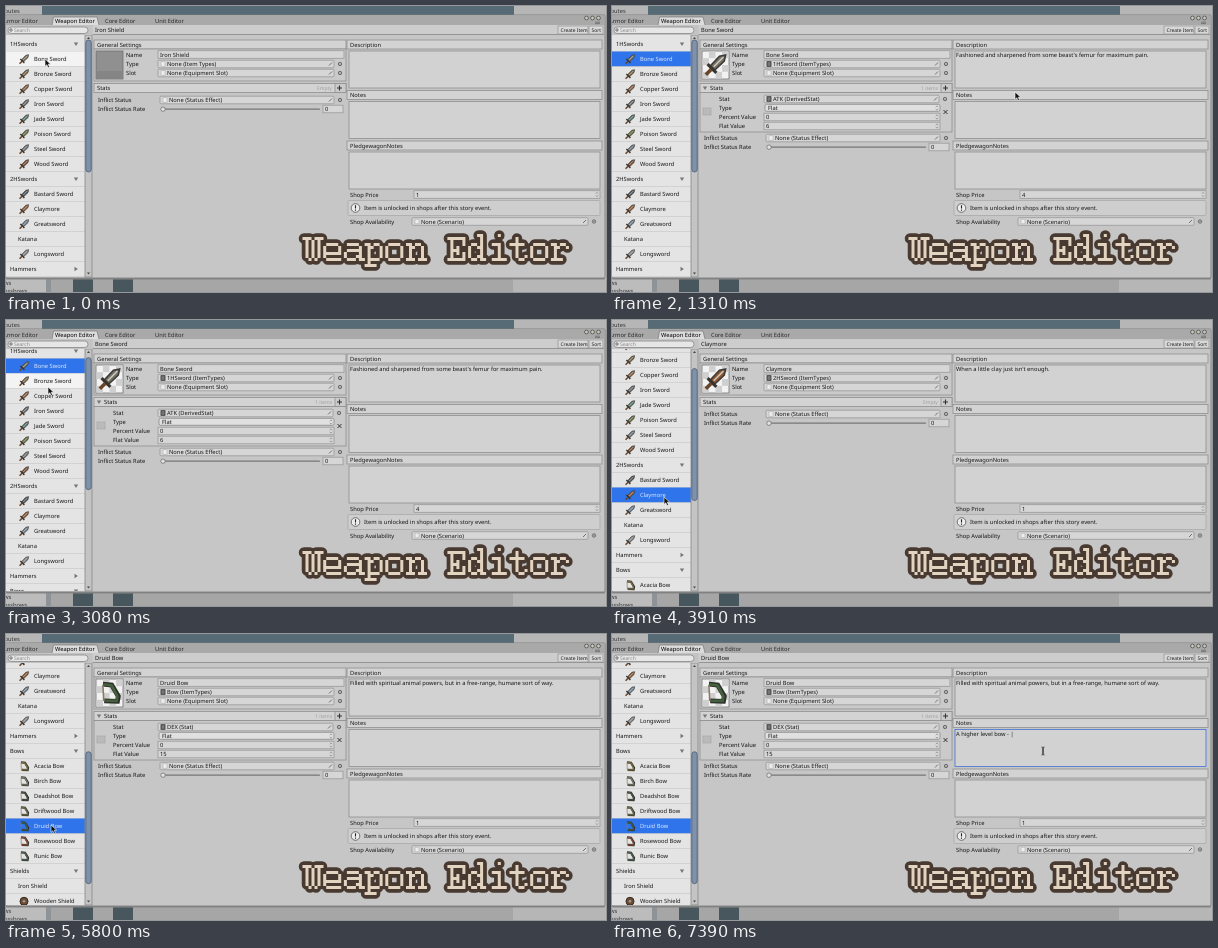
Animation, 600 px wide and 286 px high, one loop 8 s. Source, as an HTML page:

```html
<!DOCTYPE html>
<html lang="en">
<head>
<meta charset="utf-8">
<title>Weapon Editor</title>
<style>
html, body { margin: 0; width: 600px; height: 286px; overflow: hidden; background: #c4c4c4; }
svg { display: block; position: absolute; left: 0; top: 0; }
text { font-family: "Noto Sans", "Open Sans", sans-serif; text-rendering: geometricPrecision; white-space: pre; }
</style>
</head>
<body>
<svg id="ui" width="600" height="286" viewBox="0 0 600 286"></svg>
<svg id="logo" width="600" height="286" viewBox="0 0 600 286" role="img" aria-label="Weapon Editor"></svg>
<script>
const LOOP = 8000;
const INK = '#161616', BLUE = '#2f74ea', LINE = '#8f8f8f';

// Drawing helpers; text is placed by its vertical centre.
const box = (x, y, w, h, fill, stroke, r = 0) =>
  `<rect x="${x}" y="${y}" width="${w}" height="${h}" rx="${r}" fill="${fill}"` +
  (stroke ? ` stroke="${stroke}" stroke-width=".8"` : '') + '/>';
const text = (x, y, s, fill = INK, size = 5.75) =>
  `<text x="${x}" y="${y + 2.1}" font-size="${size}" fill="${fill}">${s}</text>`;
const path = (d, stroke, w = 1, fill = 'none', more = '') =>
  `<path d="${d}" stroke="${stroke}" stroke-width="${w}" fill="${fill}" ${more}/>`;
const ring = (x, y, r, stroke = '#555', fill = 'none') =>
  `<circle cx="${x}" cy="${y}" r="${r}" fill="${fill}" stroke="${stroke}" stroke-width=".8"/>`;
const arrow = (x, y) => path(`M${x - 2.2} ${y - 1.6}h4.4l-2.2 3.6z`, 'none', 0, '#777');

// Weapon list: "#" group, "-" plain entry, otherwise name and colour.
const rows = [
  ['#1HSwords'], ['Bone Sword', '#77715f'], ['Bronze Sword', '#7d6440'], ['Copper Sword', '#8d5b3c'],
  ['Iron Sword', '#686868'], ['Jade Sword', '#54766a'], ['Poison Sword', '#64703a'],
  ['Steel Sword', '#6c757d'], ['Wood Sword', '#7d4a2c'],
  ['#2HSwords'], ['Bastard Sword', '#4c535b'], ['Claymore', '#93562b'], ['Greatsword', '#6c8296'],
  ['-Katana'], ['Longsword', '#84888a'], ['#Hammers'], ['#Bows'],
  ['Acacia Bow', '#7d6a3a'], ['Birch Bow', '#77776a'], ['Deadshot Bow', '#4b5240'], ['Driftwood Bow', '#6d6a48'],
  ['Druid Bow', '#44603f'], ['Rosewood Bow', '#8e4a35'], ['Runic Bow', '#4c6258'],
  ['#Shields'], ['-Iron Shield'], ['Wooden Shield', '#6d4a30']
];
const rowY = i => 38 + 15 * i;

const items = {
  'Iron Shield': { type: 'None (Item Types)', desc: '', price: 1 },
  'Bone Sword': { type: '1HSword (ItemTypes)', stat: ['ATK (DerivedStat)', 6], price: 4,
    desc: "Fashioned and sharpened from some beast's femur for maximum pain." },
  'Claymore': { type: '2HSword (ItemTypes)', desc: "When a little clay just isn't enough.", price: 1 },
  'Druid Bow': { type: 'Bow (ItemTypes)', stat: ['DEX (Stat)', 15], price: 1,
    desc: 'Filled with spiritual animal powers, but in a free-range, humane sort of way.' }
};

// The screen refreshes only at these moments: [first, last, count].
const ticks = [
  [0, 120, 2], [270, 390, 2], [630, 930, 3], [1080, 1790, 7], [1910, 2380, 5], [2620, 3200, 6],
  [3440, 3910, 5], [4710, 4710, 1], [4860, 5100, 3], [5240, 5480, 3], [5680, 5800, 2],
  [5950, 6060, 2], [6210, 6210, 1], [6450, 6670, 3], [7030, 7390, 4]
].flatMap(([a, b, n]) => Array.from({ length: n }, (_, i) =>
  n < 2 ? a : Math.floor((a + (b - a) * i / (n - 1)) / 10) * 10));

const cursorKeys = [[0, 39, 53], [390, 42, 54], [630, 150, 65], [930, 325, 82], [1200, 400, 86], [1310, 403, 86],
  [1550, 402, 85], [1790, 380, 82], [2030, 250, 72], [2380, 58, 67], [2620, 43, 67], [3080, 42, 67],
  [3440, 43, 72], [3800, 51, 172], [3910, 52, 177], [5480, 52, 178], [5680, 45, 190], [5800, 45, 191],
  [6060, 320, 135], [6210, 431, 117]];
const scrollKeys = [[0, 0], [2850, 0], [3080, 7], [3440, 28], [4710, 28], [4860, 52], [5100, 104], [5240, 120], [5480, 161]];
const picks = [[0, 'Iron Shield'], [270, 'Bone Sword'], [3910, 'Claymore'], [5800, 'Druid Bow']];
const typing = [[6210, ''], [6450, 'A h'], [6560, 'A hig'], [6670, 'A highe'], [7030, 'A higher lev'],
  [7150, 'A higher level b'], [7270, 'A higher level bow'], [7390, 'A higher level bow - ']];

const last = (keys, t) => keys.filter(k => k[0] <= t).pop();
function mix(keys, t) {
  const a = last(keys, t), b = keys[keys.indexOf(a) + 1];
  if (!b) return a.slice(1);
  const p = (t - a[0]) / (b[0] - a[0]);
  return a.slice(1).map((v, i) => v + (b[i + 1] - v) * p);
}

// Icon on a 10 unit square centred on x, y.
function icon(name, color, x, y, k = 1) {
  let d;
  if (name.endsWith('Bow')) {
    d = path('M-3-4L1-3.6L4 1.5L3.6 3.8L-2.4 3.6', '#2d3029', 2.2) +
        path('M-2.8-4L1-3.4L3.6 1.6L3.2 3.6L-2 3.5', color, 1.2) +
        path('M-3-3.6L-2.6 3.6', '#8b7a5c', .7);
  } else if (name.endsWith('Shield')) {
    d = `<circle r="4" fill="${color}" stroke="#352a22"/><circle r="1.3" fill="#999"/>`;
  } else {
    d = path('M4.6-4.6L1.8-4L-2.4.4L-.4 2.4L4-1.8z', '#3a3a3a', .7, color) +
        path('M3.6-3.6L-.8.8', '#c9c9c4', .7) +
        path('M-3.6-.4L.4 3.6', '#3a342e', 1.4) + path('M-2 2L-4.4 4.4', '#6a4427', 1.6);
  }
  return `<g transform="translate(${x} ${y}) scale(${k})">${d}</g>`;
}

function backdrop() {
  const tabs = [['Armor Editor', -3], ['Core Editor', 99], ['Unit Editor', 149]];
  return box(0, 0, 600, 286, '#b6b6b6') + box(36, 0, 472, 9, '#566b75') +
    text(-3, 5, 'ibutes', '#333') +
    box(0, 272, 507, 14, '#a6a6a6') + box(0, 272, 40, 14, '#bcbcbc') + box(40, 272, 5, 14, '#8e9398') +
    text(-2, 277, 'ws', '#333') + text(-2, 285, 'ossbows', '#333') +
    box(67, 273, 20, 13, '#48565e') + box(107, 273, 20, 13, '#48565e') +
    box(0, 271, 599, 2.4, '#888', '', 1) +
    box(0, 9, 599, 263, '#c6c6c6', '#777', 1) + box(0, 9.5, 598, 9.5, '#a9a9a9') +
    tabs.map(([s, x]) => text(x, 15, s, '#2a2a2a')).join('') +
    path('M46 19L47.5 11H91L93 19', '#777', .7, '#dcdcdc') + text(49, 15, 'Weapon Editor', '#000') +
    [580.5, 586.5, 592.5].map(x => ring(x, 12, 1.9, '#4c4c4c', '#c9c9bd')).join('') +
    path('M589 17.6h5M589 16.2h5', '#555', .6);
}

function list(scroll, picked, cy, hovering) {
  let s = box(0, 29, 79, 242, '#e4e4e4');
  rows.forEach(([raw, color], i) => {
    const y = rowY(i) - scroll, on = raw === picked, name = raw.replace(/^[#-]/, '');
    if (y < 20 || y > 282) return;
    if (on && color) s += box(0, y - 7.5, 79, 15, BLUE);
    else if (hovering && Math.abs(cy + 1 - y) < 7.5) s += box(0, y - 7.5, 79, 15, '#f3f3f3');
    s += box(0, y + 7.2, 79, .6, '#c6c6c6');
    s += text(raw[0] === '#' ? 4 : color ? 28 : 12, y, name, on && color ? '#dfe9ff' : INK);
    if (color) s += icon(name, color, 18, y + .3);
    if (name === 'Hammers') s += path(`M68.5 ${y - 2.2}v4.4l3.4-2.2z`, 'none', 0, '#777');
    else if (raw[0] === '#') s += arrow(70, y);
  });
  return `<g clip-path="url(#listClip)">${s}</g>` +
    box(79, 29, 7, 242, '#c4c4c4', '#888') +
    box(79.8, 34 + scroll * .52, 5.4, 132, '#7f92ab', '#4d5d72', 2.7) +
    path('M81 33l1.5-2l1.5 2zM81 266.5l1.5 2l1.5-2z', 'none', 0, '#444') +
    box(0, 19, 86, 10, '#c3c3c3') + box(2, 21, 80, 6.5, '#e6e6e6', '#888', 3.2) +
    ring(5, 24, 1.2) + text(8, 24, 'Search', '#888', 5);
}

const header = (x, y, w, s, h = 9) => box(x, y, w, h, '#d3d3d3', LINE) + text(x + 3, y + h / 2, s);
const area = (y, s, focus) => box(343, y, 251, 37, '#d2d2d2', focus ? '#3f73d8' : LINE) + text(344, y + 4, s);
const field = (x, y, w, s) => box(x, y - 3.8, w, 7.6, '#d6d6d6', '#999') + text(x + 2, y, s);
const picker = (x, y, w, s, set) =>
  box(x, y - 3.8, w, 7.6, '#d6d6d6', '#999', 1) +
  box(x + 3, y - 2.3, 4, 4.6, set ? '#777' : '#eee', set ? '#333' : '#bbb') + text(x + 9, y, s) +
  path(`M${x + w - 5} ${y + 1.5}l3-3`, '#666', .9) + ring(x + w + 6, y, 1.7) +
  `<circle cx="${x + w + 6}" cy="${y}" r=".6" fill="#555"/>`;
const spin = (x, y) => path(`M${x - 1.2} ${y - .8}l1.2-1.4l1.2 1.4M${x - 1.2} ${y + .8}l1.2 1.4l1.2-1.4`, '#777', .6);

function preview(name) {
  const color = (rows.find(r => r[0] === name) || [])[1];
  if (!color) return box(90, 45, 27, 28, '#909090', '#6f6f6f') + box(90.4, 65, 26.2, 7.6, '#858585');
  let s = box(90, 45, 27, 28, '#f2f2f2', '#6f6f6f');
  for (let i = 0; i < 16; i++)
    if ((i + (i >> 2)) % 2) s += box(90.4 + i % 4 * 6.55, 45.4 + (i >> 2) * 6.8, 6.55, 6.8, '#cfcfcf');
  return s + icon(name, color, 103.5, 59, 2.2);
}

function stats(stat) {
  let s = header(88, 77.5, 252, stat ? '' : 'Stats') +
    text(stat ? 309 : 311, 82, stat ? '1 items' : 'Empty', '#a0a0a0', 5) +
    box(329, 77.5, 11, 9, '#cbcbcb', LINE) + path('M331 82h5M333.5 79.5v5', '#333', 1.1);
  const dy = stat ? 38 : 0;
  if (stat) {
    s += arrow(93, 82) + text(98, 82, 'Stats') + box(88, 86.5, 252, 39.5, '#cacaca', LINE) +
      box(91, 102, 8, 7, '#bababa', '#aaa') +
      text(107, 93, 'Stat') + picker(152, 93, 175, stat[0], true) +
      text(107, 102, 'Type') + box(153, 98.3, 175, 7, '#e0e0e0', '#888', 1.5) + text(156, 102, 'Flat') + spin(325, 102) +
      text(107, 111, 'Percent Value') + field(152, 111, 176, '0') + spin(325, 111) +
      text(107, 120, 'Flat Value') + field(152, 120, 176, stat[1]) + spin(325, 120) +
      path('M331.5 104l4 4m0-4l-4 4', '#333', 1);
  }
  return s + text(92, 94 + dy, 'Inflict Status') + picker(154, 94 + dy, 174, 'None (Status Effect)') +
    text(92, 103 + dy, 'Inflict Status Rate') + box(156, 102.6 + dy, 158, 1.2, '#777', '', .6) +
    `<circle cx="157" cy="${103.2 + dy}" r="2.2" fill="#e2e2e2" stroke="#666" stroke-width=".7"/>` +
    field(317, 103 + dy, 20, '0');
}

function details(name, notes) {
  const it = items[name], focus = notes !== undefined;
  return box(87, 19, 511, 9.5, '#cdcdcd') + box(87, 28, 511, .8, '#888') + text(89, 24, name) +
    box(552, 20, 30, 8, '#d8d8d8', '#999') + text(554.5, 24, 'Create Item', INK, 4.9) +
    box(583, 20, 14, 8, '#d8d8d8', '#999') + text(585.5, 24, 'Sort', INK, 4.9) +
    header(88, 34, 252, 'General Settings') + box(88, 43, 252, 32, '#cacaca', LINE) + preview(name) +
    text(120, 48.5, 'Name') + field(152, 48.5, 186, name) +
    text(120, 58, 'Type') + picker(152, 58, 176, it.type, it.type[0] !== 'N') +
    text(120, 67, 'Slot') + picker(152, 67, 176, 'None (Equipment Slot)') + stats(it.stat) +
    header(341, 34, 255, 'Description') + area(45, it.desc) +
    header(341, 84.5, 255, 'Notes') +
    area(95.5, focus ? notes + `<tspan fill="#222">|</tspan>` : '', focus) +
    header(341, 135, 255, 'PledgewagonNotes') + area(146, '') +
    text(344, 188.5, 'Shop Price') + field(408, 188.5, 186, it.price) + spin(591, 188.5) +
    box(342, 194.5, 252, 15, '#cecece', '#aaa', 1) +
    ring(349.5, 202, 4.3, '#555', '#eee') +
    path('M349.5 199.3v3.2M349.5 203.6v1.2', '#222', 1.1) +
    text(358, 202, 'Item is unlocked in shops after this story event.') +
    text(344, 215.5, 'Shop Availability') + picker(406, 215.5, 176, 'None (Scenario)');
}

const pointer = (x, y, beam) => beam
  ? path(`M${x - 1.5} ${y - 4}q1.5 0 1.5 1v6q0 1-1.5 1M${x + 1.5} ${y - 4}q-1.5 0-1.5 1v6q0 1 1.5 1`, '#222', .8)
  : path(`M${x} ${y}v7.4l1.8-1.6l1.3 2.8l1.4-.7l-1.3-2.7h2.5z`, '#fff', .6, '#111');

const ui = document.getElementById('ui');
const clip = '<defs><clipPath id="listClip"><rect y="29" width="79" height="242"/></clipPath></defs>';

function draw(t) {
  const [x, y] = mix(cursorKeys, t), [scroll] = mix(scrollKeys, t);
  const picked = last(picks, t)[1], notes = last(typing, t);
  ui.innerHTML = clip + backdrop() + list(scroll, picked, y, x < 79) +
    details(picked, notes && notes[1]) + pointer(x, y, !!notes);
}

// Blocky slab lettering, drawn as strokes on a 3px grid.
const glyphs = {
  W: 'M0 0H2M4 0H6M1 0V6M5 0V6M3 1V6M2 7h.01M4 7h.01',
  e: 'M1 2H4M0 3V6M5 3V5M0 5H5M1 7H5',
  a: 'M1 2H4M5 3V7H6M1 4H5M0 5V6M1 7H3M4 6h.01',
  p: 'M0 2H1V9M0 9H3M3 2H4M2 3h.01M5 3V6M2 7H4',
  o: 'M1 2H4M0 3V6M5 3V6M1 7H4',
  n: 'M0 2H1V7M0 7H2M2 3h.01M3 2H4M5 3V7M4 7H6',
  E: 'M0 0H5V2M1 0V7M0 7H5V5M1 4H3M3 3V5',
  d: 'M3-1H4V7H5M1 2H2M3 3h.01M0 3V6M1 7H2M3 6h.01',
  i: 'M3-1h.01M1 2H3V7M1 7H5',
  t: 'M2 0V6M0 2H4M3 7H4M5 6h.01',
  r: 'M0 2H1V7M0 7H3M2 3h.01M3 2H4M5 3h.01'
};
const word = (color, w, cap) => [...'Weapon Editor'].map((c, i) => glyphs[c]
  ? `<g transform="translate(${298 + i * 20.7} 232.5) scale(3)">` +
    path(glyphs[c], color, w, 'none', `stroke-linecap="${cap}" stroke-linejoin="${cap === 'round' ? cap : 'miter'}"`) +
    '</g>' : '').join('');
document.getElementById('logo').innerHTML = word('#483a30', 3.5, 'round') + word('#e3d4c2', 1, 'square');

const start = performance.now();
let shown = -1;
function frame() {
  const now = (performance.now() - start) % LOOP;
  const t = ticks.filter(k => k <= now).pop() || 0;
  if (t !== shown) draw(shown = t);
  requestAnimationFrame(frame);
}
frame();
</script>
</body>
</html>
```
